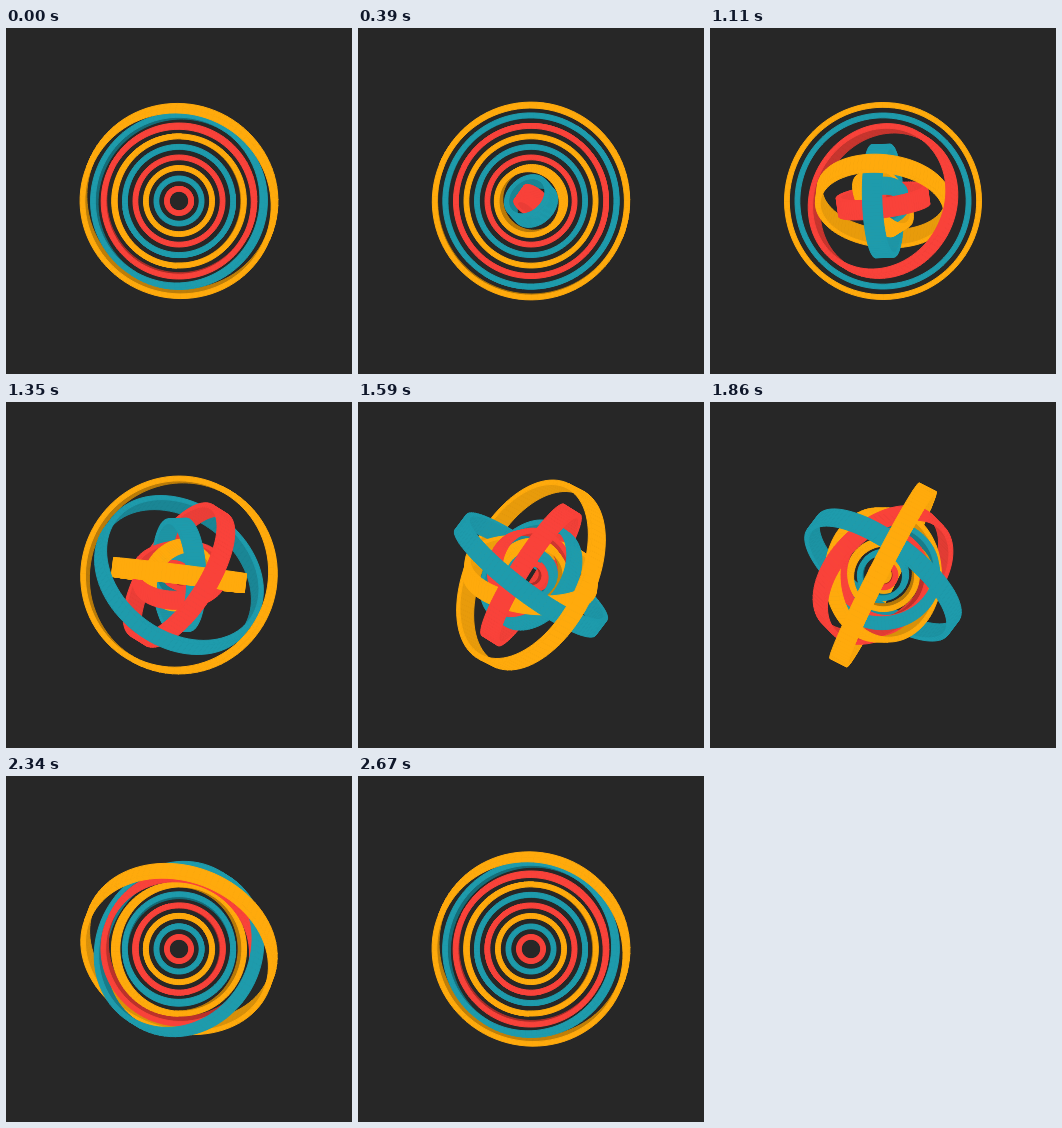
An HTML page with a canvas for the animation above (2.7 s loop, 346 by 346 pixels).

```html
<!DOCTYPE html>
<html lang="en">
<head>
<meta charset="utf-8">
<title>Gyroscope rings</title>
<style>
  html, body { margin: 0; height: 100%; overflow: hidden; background: #272727; }
  canvas { display: block; width: 346px; height: 346px; }
</style>
</head>
<body>
<canvas id="stage" width="346" height="346"></canvas>
<script>
const ctx = document.getElementById('stage').getContext('2d');
const LOOP = 2700, STAGGER = 160, DURATION = 2300;
const SIZE = 346, CENTER = 173, SEGMENTS = 96;
const THICKNESS = 4.8, HALF_DEPTH = 9.4;
const COLORS = [[249, 66, 58], [30, 155, 172], [255, 170, 12]];
// Direction in degrees in which each ring tips over, innermost first
const HEADINGS = [235, 132, 212, 278, 2, 263, 148, 53, 153];
const RAD = Math.PI / 180;

const shade = (rgb, k) => `rgb(${rgb.map(v => Math.round(v * k))})`;
const clamp01 = v => Math.min(1, Math.max(0, v));
const smooth = u => u * u * (3 - 2 * u);

function ringFaces(i, time, faces) {
  const phase = (time - i * STAGGER + LOOP) % LOOP;
  const tilt = Math.PI * (1 - Math.pow(1 - clamp01(phase / DURATION), 2.5));
  const heading = (HEADINGS[i] - 85 * smooth(clamp01((phase - 840) / 240))) * RAD;
  const st = Math.sin(tilt), ct = Math.cos(tilt);
  const sh = Math.sin(heading), ch = Math.cos(heading);
  const outer = 14.5 + 10.5 * i, inner = outer - THICKNESS;

  // Point on the ring at an angle, a radius and a height along its axis
  const point = (a, r, h) => {
    const u = r * Math.cos(a), v = r * Math.sin(a);
    return [
      CENTER - u * sh - v * ct * ch + h * st * ch,
      CENTER - (u * ch - v * ct * sh + h * st * sh),
      v * st + h * ct
    ];
  };
  const addFace = (a, b, [r1, h1], [r2, h2], color) => {
    const points = [point(a, r1, h1), point(b, r1, h1), point(b, r2, h2), point(a, r2, h2)];
    const z = points.reduce((sum, p) => sum + p[2], 0);
    faces.push({ points, z, color });
  };

  // The inside lies in the shade of its neighbours until the ring stands up
  const rgb = COLORS[i % 3];
  const rimColor = shade(rgb, 1), insideColor = shade(rgb, 0.65 + 0.32 * st);
  const cap = ct > 0 ? HALF_DEPTH : -HALF_DEPTH;
  const step = 2 * Math.PI / SEGMENTS;
  for (let k = 0; k < SEGMENTS; k++) {
    const a = k * step, b = a + step;
    const near = k < SEGMENTS / 2;
    const r = near ? outer : inner;
    addFace(a, b, [outer, cap], [inner, cap], rimColor);
    if (st > 1e-3) {
      addFace(a, b, [r, -HALF_DEPTH], [r, HALF_DEPTH], near ? rimColor : insideColor);
    }
  }
}

function draw(time) {
  ctx.fillStyle = '#272727';
  ctx.fillRect(0, 0, SIZE, SIZE);
  const faces = [];
  HEADINGS.forEach((_, i) => ringFaces(i, time, faces));
  faces.sort((p, q) => p.z - q.z);
  ctx.lineWidth = 1;
  ctx.lineJoin = 'round';
  for (const { points, color } of faces) {
    ctx.beginPath();
    for (const [x, y] of points) ctx.lineTo(x, y);
    ctx.closePath();
    ctx.fillStyle = ctx.strokeStyle = color;
    ctx.fill();
    ctx.stroke();
  }
}

const start = performance.now();
function tick() {
  draw((performance.now() - start) % LOOP);
  requestAnimationFrame(tick);
}
tick();
</script>
</body>
</html>
```
